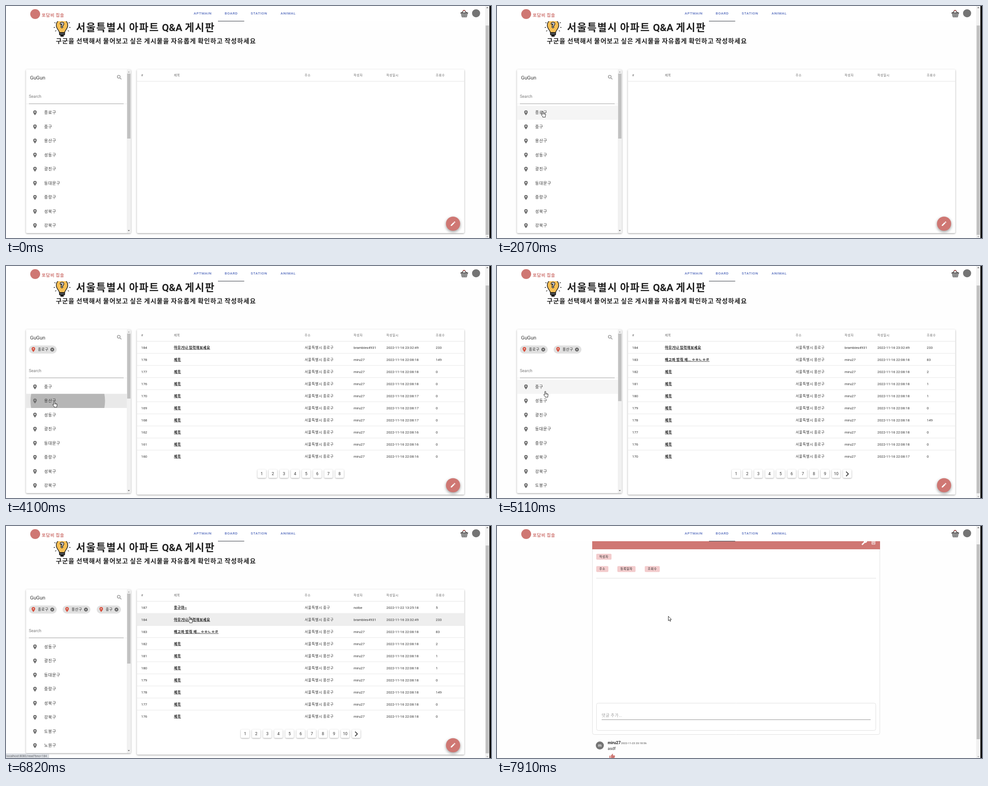
Animation, 1080 px wide and 518 px high, one loop 7.99 s. Source, as an HTML page with a canvas:

```html
<!DOCTYPE html>
<html lang="ko">
<head>
<meta charset="utf-8">
<title>Board</title>
<style>
html, body { margin: 0; width: 100%; height: 100%; overflow: hidden; background: #fff; }
canvas { display: block; }
</style>
</head>
<body>
<canvas id="stage" width="1080" height="518"></canvas>
<script>
const ctx = document.getElementById('stage').getContext('2d');
const LOOP = 7990;
const FONT = 'Roboto, "Noto Sans CJK KR", "Noto Sans CJK", sans-serif';
const CORAL = '#cf7773', INK = '#333', GREY = '#757575', LINE = '#e2e2e2';
const ROW = 31.5, LIST_TOP = 222.5, TABLE_ROW = 27, TABLE_TOP = 168;

const ICON = {
  pin: 'M12 11.5A2.5 2.5 0 0 1 9.5 9A2.5 2.5 0 0 1 12 6.5A2.5 2.5 0 0 1 14.5 9A2.5 2.5 0 0 1 12 11.5M12 2A7 7 0 0 0 5 9C5 14.25 12 22 12 22C12 22 19 14.25 19 9A7 7 0 0 0 12 2Z',
  search: 'M9.5 3A6.5 6.5 0 0 1 16 9.5C16 11.1 15.4 12.6 14.4 13.7L14.7 14H15.5L20.5 19L19 20.5L14 15.5V14.7L13.7 14.4C12.6 15.4 11.1 16 9.5 16A6.5 6.5 0 0 1 9.5 3M9.5 5A4.5 4.5 0 0 0 9.5 14A4.5 4.5 0 0 0 9.5 5Z',
  close: 'M12 2A10 10 0 0 1 12 22A10 10 0 0 1 12 2M15.6 7L12 10.6L8.4 7L7 8.4L10.6 12L7 15.6L8.4 17L12 13.4L15.6 17L17 15.6L13.4 12L17 8.4Z',
  pencil: 'M20.7 7C21.1 6.6 21.1 6 20.7 5.6L18.4 3.3C18 2.9 17.3 2.9 17 3.3L15.1 5.1L18.9 8.9M3 17.3V21H6.8L17.8 9.9L14.1 6.2Z',
  next: 'M8.6 16.6L13.2 12L8.6 7.4L10 6L16 12L10 18Z',
  wrench: 'M1.3 19L10.4 9.9C9.5 7.6 10 4.9 11.9 3C13.9 1 16.9 .6 19.3 1.7L15 6L18 9L22.4 4.7C23.6 7.1 23.1 10.1 21.1 12.1C19.2 14 16.5 14.5 14.2 13.6L5.1 22.7C4.7 23.1 4.1 23.1 3.7 22.7L1.4 20.4C.9 20 .9 19.3 1.3 19Z',
  trash: 'M9 3V4H4V6H5V19A2 2 0 0 0 7 21H17A2 2 0 0 0 19 19V6H20V4H15V3H9M7 6H17V19H7V6M9 8V17H11V8H9M13 8V17H15V8H13Z',
  like: 'M23 10A2 2 0 0 0 21 8H14.7L15.6 3.4L15.2 2L14.2 1L7.6 7.6L7 9V19A2 2 0 0 0 9 21H18L19.8 19.8L22.9 12.7V10M1 21H5V9H1Z',
  hand: 'M-1.2 1.2C-1.2 -.4 1.2 -.4 1.2 1.2V4.8L5 5.6C6.2 5.9 6.5 6.6 6.4 7.6L5.6 11.2V13.2H-.2V11.8L-3.4 8C-3.7 7 -2.6 6.4 -1.2 7.6Z',
  arrow: 'M0 0V10L2.3 7.9L3.9 11.4L5.4 10.7L3.9 7.3H7Z',
  beam: 'M-2 0H2M0 0V11M-2 11H2'
};
for (const key in ICON) ICON[key] = new Path2D(ICON[key]);

const DISTRICTS = '종로구 중구 용산구 성동구 광진구 동대문구 중랑구 성북구 강북구 도봉구 노원구'.split(' ');
const PICKS = ['종로구', '용산구', '중구'];
const PICK_TIMES = [2860, 4180, 5500];
const LOAD_TIMES = [3250, 4570, 5590];
const CHIPS = [[51, 62], [126, 62], [202, 54]];
const COLUMNS = [301, 374, 665, 774, 847, 957];

const post = (id, area, views = 0, sec = 18, title = '제목', user = 'miru27', date = `2022-11-16 22:08:${sec}`) =>
  ({ id, area, cells: [id, title, '서울특별시 ' + area, user, date, views] });
const POSTS = [
  post(187, '중구', 5, 0, '중구야~', 'nolbe', '2022-11-22 13:25:18'),
  post(184, '종로구', 233, 0, '아무거나 입력해보세요', 'brambles4931', '2022-11-16 23:32:49'),
  post(183, '용산구', 83, 18, '배고파 밥줘 왜... ㅇㅁㄴㅇㄹ'),
  ...[2, 1, 1, 0].map((v, i) => post(182 - i, '용산구', v)),
  ...[149, 0, 0].map((v, i) => post(178 - i, '종로구', v)),
  ...[170, 169, 168].map(id => post(id, '종로구', 0, 17)),
  ...[162, 161, 160].map(id => post(id, '종로구', 0, 16))
];

// Pointer moves: start, end, steps, from, control point, to
const MOVES = [
  [1370, 2070, 10, [960, 506], [450, -20], [102, 235]],
  [3250, 3720, 7, [102, 235], [104, 275], [107.5, 302]],
  [4880, 5190, 5, [107.5, 302], [107.5, 287], [107.5, 272.5]],
  [5740, 6450, 10, [107.5, 272.5], [270, 262], [409, 203]],
  [6820, 7130, 5, [409, 203], [408, 196], [393, 181.5]],
  [7760, 7910, 3, [393, 181.5], [388, 190], [381.5, 201.5]]
];
const CLICKS = [[2700, 0], [4020, 2], [5340, 1]];

const countPast = (times, t) => times.filter(v => t >= v).length;

function pointerAt(t) {
  const move = MOVES.filter(m => t >= m[0]).pop();
  if (!move) return null;
  const [start, end, steps, a, c, b] = move;
  const last = steps - 1;
  const p = Math.min(last, Math.floor((t - start) / (end - start) * last + .05)) / last;
  const q = 1 - p;
  return [0, 1].map(i => q * q * a[i] + 2 * q * p * c[i] + p * p * b[i]);
}

// Hangul is set on full em squares, Latin keeps its natural widths.
function text(s, x, y, size, color = INK, { weight = 400, spacing = 0, align = 'left' } = {}) {
  ctx.font = `${weight} ${size}px ${FONT}`;
  ctx.textAlign = align;
  ctx.fillStyle = color;
  let width = 0;
  for (const run of s.match(/[ㄱ-힣]+|[^ㄱ-힣]+/g)) {
    ctx.letterSpacing = (/[ㄱ-힣]/.test(run) ? size * .08 : spacing) + 'px';
    ctx.fillText(run, x + width, y + size * .36);
    width += ctx.measureText(run).width;
  }
  return width;
}

function rect(x, y, w, h, color) {
  ctx.fillStyle = color;
  ctx.fillRect(x, y, w, h);
}

function rounded(x, y, w, h, r, fill, stroke) {
  ctx.beginPath();
  ctx.roundRect(x, y, w, h, r);
  if (fill) { ctx.fillStyle = fill; ctx.fill(); }
  if (stroke) { ctx.strokeStyle = stroke; ctx.lineWidth = 1; ctx.stroke(); }
}

function circle(x, y, r, color) {
  ctx.beginPath();
  ctx.arc(x, y, r, 0, Math.PI * 2);
  ctx.fillStyle = color;
  ctx.fill();
}

function raised(draw, blur = 3.5, dy = 1.3, alpha = .36) {
  ctx.save();
  ctx.shadowColor = `rgba(0,0,0,${alpha})`;
  ctx.shadowBlur = blur;
  ctx.shadowOffsetY = dy;
  draw();
  ctx.restore();
}

function icon(name, x, y, size, color) {
  ctx.save();
  ctx.translate(x - size / 2, y - size / 2);
  ctx.scale(size / 24, size / 24);
  ctx.fillStyle = color;
  ctx.fill(ICON[name], 'evenodd');
  ctx.restore();
}

function clipped(x, y, w, h, draw) {
  ctx.save();
  ctx.beginPath();
  ctx.rect(x, y, w, h);
  ctx.clip();
  draw();
  ctx.restore();
}

function triangle(x, y, dir, color) {
  ctx.beginPath();
  ctx.moveTo(x - 2.2, y - dir);
  ctx.lineTo(x + 2.2, y - dir);
  ctx.lineTo(x, y + dir * 1.2);
  ctx.fillStyle = color;
  ctx.fill();
}

function lines(points, color, width) {
  ctx.beginPath();
  for (const [x1, y1, x2, y2] of points) { ctx.moveTo(x1, y1); ctx.lineTo(x2, y2); }
  ctx.strokeStyle = color;
  ctx.lineWidth = width;
  ctx.stroke();
}

function drawBulb() {
  ctx.save();
  ctx.lineCap = ctx.lineJoin = 'round';
  ctx.beginPath();
  ctx.moveTo(119, 60);
  ctx.bezierCurveTo(119, 54, 112, 52, 112, 43);
  ctx.bezierCurveTo(112, 26, 137.5, 26, 137.5, 43);
  ctx.bezierCurveTo(137.5, 52, 130.5, 54, 130.5, 60);
  ctx.closePath();
  ctx.fillStyle = '#f5bf55';
  ctx.fill();
  ctx.strokeStyle = '#1c1c1c';
  ctx.lineWidth = 1.5;
  ctx.stroke();
  ctx.font = `700 15px ${FONT}`;
  ctx.textAlign = 'center';
  ctx.letterSpacing = '0px';
  ctx.lineWidth = 3;
  ctx.strokeText('?', 124.8, 48.3);
  ctx.fillStyle = '#fff';
  ctx.fillText('?', 124.8, 48.3);
  rounded(118.3, 58.5, 13, 7, 2, '#1c1c1c');
  rounded(121, 65, 7.6, 3.6, 1.5, '#1c1c1c');
  lines([[120.5, 62, 129, 62]], '#aeb6bd', 1.2);
  lines([[106.8, 48, 108.6, 47.7], [108.2, 37, 109.8, 37.8], [110, 56, 111.4, 55],
    [143, 48, 141.2, 47.7], [141.6, 37, 140, 37.8], [139.6, 56, 138.2, 55]], '#1c1c1c', 1.3);
  ctx.restore();
}

function drawBasket() {
  lines([[1020, 9, 1014.5, 15.5], [1020, 9, 1026, 15.5]], '#3a2b2b', 1.3);
  lines([[1017.5, 10, 1022.5, 10]], '#b5605a', 2);
  lines([[1012, 15.5, 1029, 15.5]], '#222', 1.6);
  lines([[1013.5, 16, 1015.5, 24.5], [1027.5, 16, 1025.5, 24.5], [1015, 24.5, 1026, 24.5],
    [1014, 18.5, 1027, 18.5], [1014.5, 21.5, 1026.5, 21.5],
    [1017, 16, 1018, 24], [1020.5, 16, 1020.5, 24], [1024, 16, 1023, 24]], '#222', .9);
}

function drawHeader() {
  rect(0, 0, 1067, 34, '#fff');
  circle(65, 18, 11, CORAL);
  text('포담비 집솔', 79.5, 20.5, 9.6, CORAL, { weight: 700 });
  const tabs = { APTMAIN: 418, BOARD: 487, STATION: 545, ANIMAL: 611.5 };
  for (const name in tabs) text(name, tabs[name], 16.3, 7.875, '#5169bb', { weight: 500, spacing: .7 });
  rect(472, 33.2, 58.5, 1.2, '#4c5159');
  drawBasket();
  circle(1046.8, 16.2, 9, GREY);
}

function drawPageScroll(top, bottom) {
  rect(1067, 0, 10, 518, '#f1f1f1');
  rect(1068, top, 7.5, bottom - top, '#c1c1c1');
  triangle(1071.8, 3.5, -1, '#505050');
  triangle(1071.8, 515, 1, '#a3a3a3');
  rect(1076.5, 0, 3.5, 518, '#000');
}

function drawRipple(t, row) {
  const click = CLICKS.find(([at], i) => t >= at && t < PICK_TIMES[i]);
  if (!click || click[1] !== row) return;
  const y = LIST_TOP + row * ROW;
  const grown = t - click[0] >= 80;
  rect(44.5, y, 224.5, ROW, '#e9e9e9');
  clipped(44.5, y, 224.5, ROW, () => circle(grown ? 137.5 : 121, y + ROW / 2, grown ? 83 : 42, grown ? '#b6b6b6' : '#c4c4c4'));
}

function drawSidebar(t, tip) {
  const picked = PICKS.slice(0, countPast(PICK_TIMES, t));
  raised(() => rounded(44.5, 141.5, 233.5, 365.5, 2.5, '#fff'));
  text('GuGun', 53.5, 160, 11.25, '#3a3a3a');
  icon('search', 252.5, 159.3, 13.5, GREY);

  picked.forEach((name, i) => {
    const [x, w] = CHIPS[i];
    rounded(x, 177.5, w, 18, 9, '#e0e0e0');
    icon('pin', x + 10, 186.5, 13.5, '#d9513f');
    text(name, x + 20, 186.2, 7.875, '#222');
    icon('close', x + w - 10, 186.5, 10.2, '#5e5e5e');
  });

  const shift = picked.length ? 1 : 0;
  const base = 217.8 + shift * ROW;
  text('Search', 51, base - 15.8, 9, '#7c7c7c');
  rect(44.5, base + .2, 224.5, .8, '#ececec');
  rect(51, base, 211, .9, t >= 3100 && t < 3330 ? '#333' : '#989898');

  clipped(44.5, 141.5, 224.5, 365.5, () => {
    const rest = DISTRICTS.filter(d => !picked.includes(d));
    rest.slice(0, 9 - shift).forEach((name, i) => {
      const row = i + shift, y = LIST_TOP + row * ROW;
      if (overList(tip, row)) rect(44.5, y, 224.5, ROW, '#f5f5f5');
      drawRipple(t, row);
      icon('pin', 64.5, y + 16, 13.5, '#6f6f6f');
      text(name, 85, y + 15.6, 9, INK);
    });
  });

  rect(269, 141.5, 9, 365.5, '#f1f1f1');
  rect(269.8, 151, 7.4, 145 + Math.max(0, picked.length - 1) * 5.6, '#c1c1c1');
  triangle(273.4, 147.3, -1, '#a3a3a3');
  triangle(273.4, 501.5, 1, '#505050');
}

function overList(tip, row) {
  const y = LIST_TOP + row * ROW;
  return tip && tip[0] > 44 && tip[0] < 269 && tip[1] >= y && tip[1] < y + ROW;
}

function drawPager(pages) {
  const more = pages === 10, count = pages + (more ? 1 : 0);
  for (let i = 0; i < count; i++) {
    const x = 656.2 + (i - (count - 1) / 2) * 24.75;
    raised(() => rounded(x - 9.5, 454.3, 19, 19, 2.25, '#fff'), 3, 1, .36);
    if (i < pages) text(String(i + 1), x, 464, 9, INK, { align: 'center' });
    else icon('next', x, 464.2, 23, '#444');
  }
}

function drawTable(t, tip) {
  const loaded = countPast(LOAD_TIMES, t);
  const grow = loaded ? 3.5 : 0;
  raised(() => rounded(291.5, 141.5, 729, 365.5 + grow, 2.5, '#fff'));
  ['#', '제목', '주소', '작성자', '작성일시', '조회수'].forEach((s, i) =>
    text(s, COLUMNS[i], 154.2, 6.75, '#666'));
  rect(291.5, TABLE_TOP - .3, 729, .8, '#dcdcdc');

  const areas = PICKS.slice(0, loaded);
  POSTS.filter(p => areas.includes(p.area)).slice(0, 10).forEach((p, i) => {
    const y = TABLE_TOP + i * TABLE_ROW;
    const hovered = tip && tip[0] > 291 && tip[1] >= y && tip[1] < y + TABLE_ROW;
    if (hovered) rect(291.5, y, 729, TABLE_ROW, '#eee');
    if (i < 9) rect(291.5, y + TABLE_ROW - .3, 729, .8, LINE);
    p.cells.forEach((cell, c) => {
      const isTitle = c === 1;
      const w = text(String(cell), COLUMNS[c], y + 13.7, 7.875, isTitle ? '#111' : INK, { weight: isTitle ? 700 : 400 });
      if (isTitle) rect(COLUMNS[c], y + 17.7, w, .8, '#111');
    });
  });
  if (loaded) drawPager(loaded > 1 ? 10 : 8);

  raised(() => circle(995.5, 486 + grow, 15.8, CORAL), 6, 2.5, .4);
  icon('pencil', 995.5, 486 + grow, 13.5, '#fff');
}

function drawBoard(t, tip) {
  drawBulb();
  text('서울특별시 아파트 Q&A 게시판', 156, 48.3, 22.5, '#212121', { weight: 700 });
  text('구군을 선택해서 물어보고 싶은 게시물을 자유롭게 확인하고 작성하세요', 111, 78.3, 14.06, '#212121', { weight: 700 });
  drawSidebar(t, tip);
  drawTable(t, tip);
}

function drawArticle() {
  rounded(212.5, 20, 640, 445.5, 4, '#fff', '#e0e0e0');
  rect(212, 34, 641, 18, CORAL);
  icon('wrench', 818, 36.5, 13.5, '#fff');
  icon('trash', 838.3, 36.3, 13.5, '#fff');
  const tags = [['작성자', 221, 62, 34], ['주소', 221, 89.5, 27], ['등록일자', 268, 89.5, 40.5], ['조회수', 329, 89.5, 33.5]];
  for (const [s, x, y, w] of tags) {
    rounded(x, y, w, 13.3, 2.25, '#f3cccd');
    text(s, x + 6.7, y + 6.4, 6.75, '#222');
  }
  rect(221, 116, 623, 1, '#dedede');
  rounded(221.5, 395.5, 622, 61, 4, '#fff', '#e0e0e0');
  text('댓글 추가...', 233, 422.5, 9, '#a0a0a0');
  rect(233, 432, 599, 1, '#949494');
  circle(229, 490, 9, GREY);
  text('m', 229, 489.5, 9, '#fff', { weight: 500, align: 'center' });
  text('miru27', 246.5, 483.6, 9, '#222', { weight: 700 });
  text('2022-11-23 20:18:56', 276.3, 484.3, 6.2, '#444');
  text('asdf', 246.5, 497, 9, INK);
  icon('like', 256.5, 514.5, 13.5, CORAL);
}

function drawStatus(t) {
  if (t < 6610 || t >= 7760) return;
  rounded(-2, 508.5, 97, 12, 2, '#dee1e6', '#c9ccd1');
  text(`localhost:8080/read?bno=${t < 6980 ? 184 : 187}`, 1, 513.8, 6.75, '#5f6368');
}

function drawPointer(t, tip) {
  if (!tip) return;
  const [x, y] = tip;
  const onRow = x < 269 && y > LIST_TOP + (t >= 2940 ? ROW : 0);
  const onLink = t >= 6370 && t < 7760;
  const inField = t >= 2940 && x < 262 && !onRow;
  const shape = onRow || onLink ? 'hand' : inField ? 'beam' : 'arrow';
  ctx.save();
  ctx.translate(x, y);
  ctx.lineJoin = 'round';
  ctx.fillStyle = '#fff';
  ctx.strokeStyle = '#222';
  ctx.lineWidth = .95;
  ctx.fill(ICON[shape]);
  ctx.stroke(ICON[shape]);
  if (shape === 'hand') lines([[1.2, 5, 1.2, 7.2], [3.2, 5.4, 3.2, 7.4], [5, 5.8, 5, 7.6]], '#222', .7);
  ctx.restore();
}

function render(t) {
  const tip = pointerAt(t);
  const reading = t >= 7360;
  const veil = t < 7280 || t >= 7450 ? 0 : reading ? .5 : .6;
  rect(0, 0, 1080, 518, '#fefefe');
  clipped(0, 34, 1067, 484, () => {
    if (reading) drawArticle();
    else drawBoard(t, tip);
    if (veil) rect(0, 34, 1067, 484, `rgba(255,255,255,${veil})`);
  });
  drawHeader();
  if (reading) drawPageScroll(41, 476);
  else drawPageScroll(43.5, t >= LOAD_TIMES[0] ? 507.5 : 511);
  drawStatus(t);
  drawPointer(t, tip);
}

const begin = performance.now();
function tick() {
  render((performance.now() - begin) % LOOP);
  requestAnimationFrame(tick);
}
tick();
</script>
</body>
</html>
```
